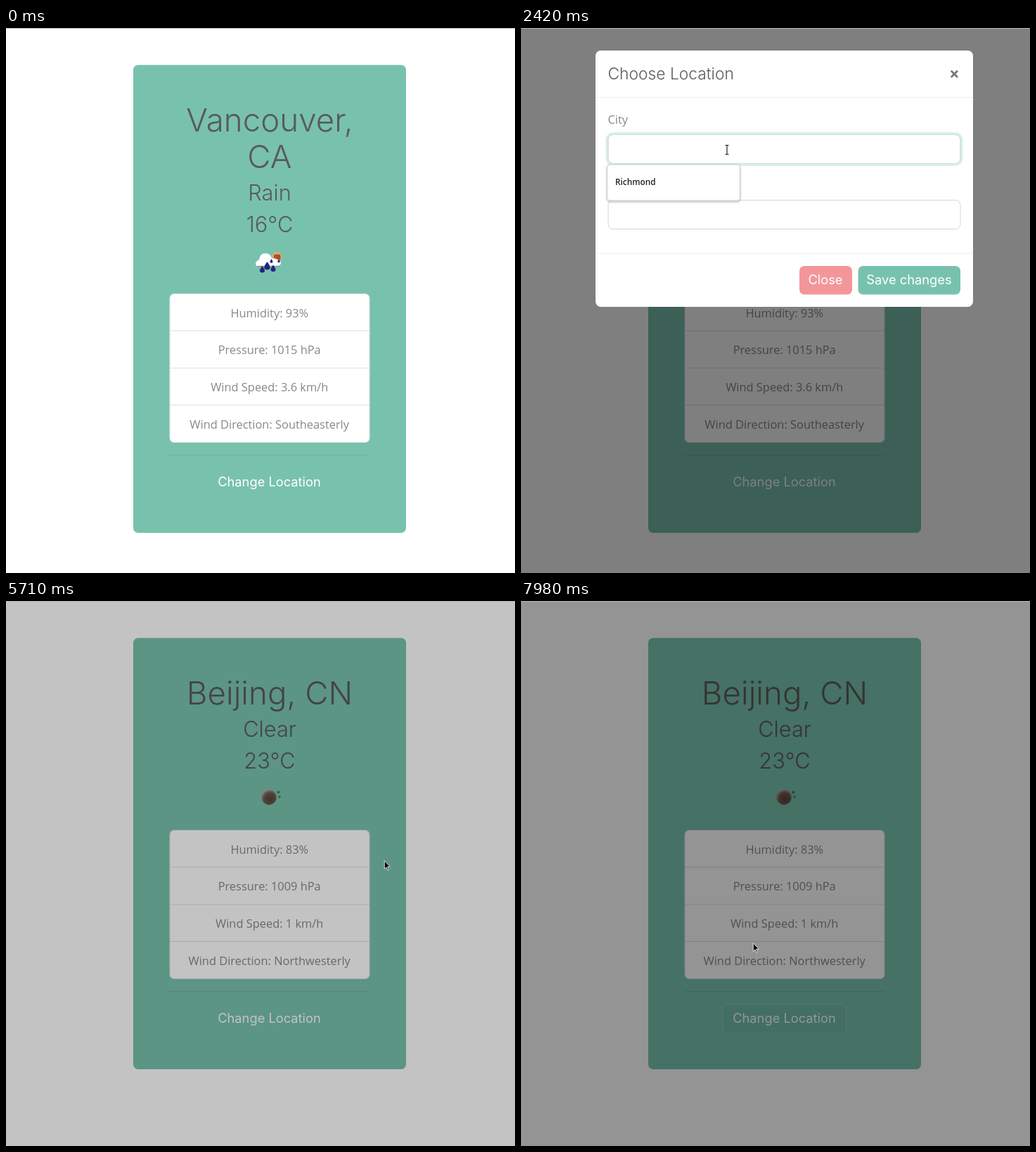
An HTML page that plays this animation: 724 px wide and 774 px high, repeating every 8 s.

```html
<!DOCTYPE html>
<html lang="en">
<head>
<meta charset="utf-8">
<title>Weather card</title>
<style>
  html, body { margin: 0; width: 100%; height: 100%; overflow: hidden; background: #fff; }
  svg { display: block; }
  text { font-family: "Open Sans", "Noto Sans", sans-serif; font-size: 16.4px; fill: #888; white-space: pre; }
  .display { font-family: Montserrat, Inter, sans-serif; fill: #5a5a5a; }
  .mid { text-anchor: middle; }
  .h1 { font-size: 45.7px; font-weight: 300; }
  .h2 { font-size: 30.8px; font-weight: 300; }
  .h5 { font-size: 22.8px; font-weight: 300; }
  .btn { font-size: 18.3px; fill: #fff; }
  .value { fill: #5a5a5a; }
</style>
</head>
<body>
<svg width="724" height="774" viewBox="0 0 724 774">
  <defs>
    <radialGradient id="moonFill" cx=".58" cy=".62" r=".62">
      <stop offset="0" stop-color="#56453a"/>
      <stop offset=".6" stop-color="#67554a"/>
      <stop offset=".85" stop-color="#8d7767"/>
      <stop offset="1" stop-color="#b5a491"/>
    </radialGradient>
    <filter id="soft" x="-10%" y="-20%" width="120%" height="150%">
      <feDropShadow dx="0" dy="1.5" stdDeviation="1.5" flood-opacity=".3"/>
    </filter>
  </defs>

  <rect id="card" x="181" y="52.5" width="388" rx="7" fill="#78c2ad"/>
  <g id="rainy" class="mid">
    <text class="display h1" x="375" y="147">Vancouver,</text>
    <text class="display h1" x="375" y="198.5">CA</text>
    <text class="display h2" x="375" y="245">Rain</text>
    <text class="display h2" x="375" y="289.5">16°C</text>
    <g>
      <circle cx="385.5" cy="325.5" r="6.3" fill="#e9a868" stroke="#e9a868" stroke-width="3" stroke-dasharray="2.5 2.45"/>
      <rect x="381" y="321.5" width="9.500" height="8.500" rx="2.500" fill="#a8522f"/>
      <path d="M356 338q-3-6 4-9 1-9 9-9 7 0 9 7 7 0 8 2 4 0 5 4 0 4-4 5z" fill="#fff"/>
      <path d="M357 338.5h32" stroke="#8d9398" stroke-width="1.5"/>
      <g id="drops" fill="#20267c"></g>
    </g>
  </g>
  <g id="clear" class="mid">
    <text class="display h1" x="375" y="147">Beijing, CN</text>
    <text class="display h2" x="375" y="193">Clear</text>
    <text class="display h2" x="375" y="237.5">23°C</text>
    <circle cx="374" cy="278.7" r="10.7" fill="url(#moonFill)"/>
    <g fill="#4d7569">
      <circle cx="387.5" cy="271.5" r="2"/><circle cx="389" cy="278" r="1.7"/>
    </g>
  </g>
  <g id="details">
    <rect x="232.5" y="377" width="285" height="212" rx="7" fill="#fff"/>
    <rect x="233" y="377.5" width="284" height="211" rx="6.5" fill="none" stroke="#000" stroke-opacity=".125"/>
    <path d="M233 430h284M233 483h284M233 535.5h284" stroke="#000" stroke-opacity=".13"/>
    <g id="rows" class="mid"></g>
    <path d="M232 606.5h285" stroke="#000" stroke-opacity=".1"/>
    <rect id="changeRing" fill="none" stroke="#8ccbb9" stroke-opacity=".55"/>
    <rect id="changeHover" x="287" y="624" width="176" height="42" rx="7" fill="#5eb69d"/>
    <rect id="changeEdge" x="287" y="624.5" width="175.5" height="41.5" rx="7" fill="none" stroke="#8ed2bf"/>
    <text class="display btn mid" x="374.5" y="651">Change Location</text>
  </g>

  <rect id="backdrop" y="1" width="724" height="773"/>

  <g id="modal">
    <rect x="106" y="32" width="537" height="364" rx="7.5" fill="#fff"/>
    <path d="M106 98.5h537M106 320h537" stroke="#ececec"/>
    <text class="display h5" x="123.5" y="73">Choose Location</text>
    <path d="M611.8 60.8l9.2 9.2m0-9.2l-9.2 9.2" stroke="#777" stroke-width="2.7"/>
    <text x="123.5" y="136">City</text>
    <text x="123.5" y="229.5">Country</text>
    <g id="fields"></g>
    <g id="suggestion">
      <rect x="122.5" y="194" width="189" height="51" rx="4" fill="#fff" stroke="#ccc" filter="url(#soft)"/>
      <text x="134" y="223" style="font-size:11.8px;font-weight:600;fill:#222">Richmond</text>
    </g>
    <rect x="396" y="338" width="75" height="40.5" rx="7" fill="#f3969a"/>
    <text class="display btn mid" x="433" y="364">Close</text>
    <rect id="saveRing" fill="none" stroke="#78c2ad" stroke-opacity=".4"/>
    <rect x="479.5" y="338" width="145.5" height="40.5" rx="7" fill="#78c2ad"/>
    <rect id="saveHover" x="479.5" y="338" width="145.5" height="40.5" rx="7" fill="#58b199"/>
    <text class="display btn mid" x="552" y="364">Save changes</text>
  </g>

  <g id="pointer">
    <circle id="click" cy="1.5" r="12" fill="#ff0" fill-opacity=".52"/>
    <path id="arrow" d="M.3.8V12.4L2.9 10L4.8 14.3L6.4 13.6L4.6 9.4H8.2z" fill="#000" stroke="#fff" stroke-width=".8"/>
    <path id="beam" d="M-2.5-6.5h2l.5.6.5-.6h2M0-6V6M-2.5 6.5h2l.5-.6.5.6h2" fill="none" stroke="#222" stroke-width="1.2"/>
    <path id="hand" d="M-1.7 9V.7Q-1.5-1 0-1T1.6.7V6Q4 5 4.4 7 6.7 6 7 8 8.7 7.5 8.8 9.5V12Q8.6 14 7.2 15.5V17.5H-.5V16Q-3 13-4.8 9.8-5 7.6-3 8.2z" fill="#fff" stroke="#222" stroke-width=".9"/>
  </g>
  <path d="M0 .5h724" stroke="#b4b4b4"/>
</svg>
<script>
const LOOP = 8000, FIRST = 70, STEP = 78.3, LEAD = 12;
const CITY_FOCUS = 1860, COUNTRY_FOCUS = 3735, SAVE_FOCUS = 5385;
const OPEN = 1250, CLOSE = 5488, UPDATED = 5600;

const $ = id => document.getElementById(id);
const set = (el, attrs) => { for (const k in attrs) el.setAttribute(k, attrs[k]); };
const show = (el, on) => set(el, { display: on ? 'inline' : 'none' });
const clamp = v => Math.min(1, Math.max(0, v));
const ramp = (t, start, length = 150) => clamp((t - start) / length);
const pulse = (t, on, off, length = 150) => ramp(t, on, length) - ramp(t, off, length);
const easeOut = k => 1 - (1 - k) ** 2;
const during = (t, spans) => spans.some(([a, b]) => t >= a && t < b);
const inside = (x, y, [l, top, r, b]) => x >= l && x <= r && y >= top && y <= b;

// Waypoints are [time, x, y].
const PATHS = [
  [[70, 576, 713], [230, 525, 694], [400, 440, 660], [540, 408, 648], [1090, 408, 648],
   [1244, 380, 530], [1480, 318, 268], [1640, 298, 190], [1792, 293, 173]],
  [[4768, 293, 173], [4925, 335, 205], [5160, 480, 318], [5390, 538, 368], [5710, 538, 368],
   [5950, 550, 475], [6200, 567, 655], [6412, 577, 769]],
  [[7430, 515, 754], [7590, 452, 660], [7740, 392, 599], [7850, 385, 592], [7978, 330, 485]]
];
const VISIBLE = [[60, 2790], [4800, 6480], [7420, LOOP]];
const CLICKS = [[995, 1100], [CITY_FOCUS, 1990], [5380, 5500], [7800, 7860]];

function pointerAt(t) {
  const path = PATHS[t < 4000 ? 0 : t < 7000 ? 1 : 2];
  const i = path.findIndex(p => p[0] > t);
  if (i === 0) return path[0].slice(1);
  if (i < 0) return path[path.length - 1].slice(1);
  const [a, b] = [path[i - 1], path[i]], k = (t - a[0]) / (b[0] - a[0]);
  return [a[1] + (b[1] - a[1]) * k, a[2] + (b[2] - a[2]) * k];
}

const ROWS = [
  ['Humidity: 93%', 'Humidity: 83%'],
  ['Pressure: 1015 hPa', 'Pressure: 1009 hPa'],
  ['Wind Speed: 3.6 km/h', 'Wind Speed: 1 km/h'],
  ['Wind Direction: Southeasterly', 'Wind Direction: Northwesterly']
];
$('rows').innerHTML = ROWS.map((_, i) => `<text x="374.7" y="${410.5 + i * 52.8}"></text>`).join('');
$('drops').innerHTML = [[364.5, 343, 1], [371.5, 338, 1.2], [380, 341.5, 1], [377.5, 331, .6], [388, 331, .5]]
  .map(([x, y, s]) => `<path transform="translate(${x} ${y}) scale(${s})" d="M0-5Q7 4 0 4.5Q-7 4 0-5"/>`).join('');

const FIELDS = [
  { top: 151.5, text: 'BEIJING', focus: CITY_FOCUS, blur: COUNTRY_FOCUS,
    keys: [2790, 2950, 3030, 3185, 3265, 3340, 3420] },
  { top: 244.5, text: 'CN', focus: COUNTRY_FOCUS, blur: SAVE_FOCUS, keys: [4205, 4755] }
];
for (const field of FIELDS) {
  const g = document.createElementNS('http://www.w3.org/2000/svg', 'g');
  const box = `x="124" y="${field.top}" width="501" height="41" rx="7"`;
  g.innerHTML = `<rect fill="none" stroke="#78c2ad" stroke-opacity=".27"/>
    <rect ${box} fill="#fff" stroke="#d3d6d8"/>
    <rect ${box} fill="none" stroke="#c5e5dc"/>
    <text class="value" x="137.5" y="${field.top + 26.5}"></text>
    <rect y="${field.top + 9}" width="1" height="23" fill="#444"/>`;
  $('fields').append(g);
  [field.ring, , field.edge, field.label, field.caret] = g.children;
}

function drawRing(el, [l, top, r, b], width) {
  set(el, { x: l - width / 2, y: top - width / 2, width: r - l + width, height: b - top + width,
    rx: 7 + width / 2, 'stroke-width': width });
}

function drawField(f, t) {
  const focus = pulse(t, f.focus, f.blur, 140);
  const typed = f.keys.filter(k => t >= k).length;
  const since = t - (typed ? f.keys[typed - 1] : f.focus);
  drawRing(f.ring, [124, f.top, 625, f.top + 41], 3.4 * focus);
  set(f.edge, { opacity: focus });
  f.label.textContent = f.text.slice(0, typed);
  set(f.caret, { x: Math.round(138 + (typed ? f.label.getComputedTextLength() : 0)) });
  show(f.caret, t >= f.focus && t < f.blur && since % 1060 < 530);
}

function drawCard(t) {
  const updated = t >= UPDATED;
  set($('card'), { height: updated ? 612.5 : 664.5 });
  show($('rainy'), !updated);
  show($('clear'), updated);
  set($('details'), { transform: `translate(0 ${updated ? -52 : 0})` });
  [...$('rows').children].forEach((row, i) => row.textContent = ROWS[i][+updated]);
  const ring = 3 * (pulse(t, 1000, 1260) + ramp(t, 5780) - ramp(t, 7860, 110));
  drawRing($('changeRing'), [287, 624, 463, 666], ring);
  set($('changeHover'), { opacity: pulse(t, 395, 1090) + pulse(t, 7680, 7870) });
  set($('changeEdge'), { opacity: ramp(t, 7860, 110) });
}

function drawModal(t) {
  set($('backdrop'), { opacity: .5 * (pulse(t, 1085, 5628) + ramp(t, 7852)) });
  const lift = 54 * (1 - easeOut(ramp(t, OPEN, 300)) + easeOut(ramp(t, CLOSE, 300)));
  const opacity = pulse(t, OPEN, CLOSE);
  set($('modal'), { opacity, transform: `translate(0 ${-lift})` });
  show($('modal'), opacity > 0);
  FIELDS.forEach(f => drawField(f, t));
  show($('suggestion'), during(t, [[1940, 2790]]));
  drawRing($('saveRing'), [479.5, 338, 625, 378.5], 3.4 * ramp(t, SAVE_FOCUS, 130));
  set($('saveHover'), { opacity: ramp(t, 5230) });
}

function drawPointer(t) {
  const [x, y] = pointerAt(t);
  const shift = t >= UPDATED ? 52 : 0;
  let kind = 'arrow';
  if (during(t, [[1480, 5600]])) {
    if (inside(x, y, [479, 338, 625, 378])) kind = 'hand';
    else if (FIELDS.some(f => inside(x, y, [124, f.top, 625, f.top + 41]))) kind = 'beam';
  } else if (inside(x, y, [287, 624 - shift, 463, 666 - shift])) kind = 'hand';
  set($('pointer'), { transform: `translate(${x} ${y})` });
  show($('pointer'), during(t, VISIBLE));
  for (const id of ['arrow', 'beam', 'hand']) show($(id), id === kind);
  show($('click'), during(t, CLICKS));
}

function render(time) {
  const t = Math.max(0, FIRST + STEP * Math.floor((time - FIRST + LEAD) / STEP));
  drawCard(t);
  drawModal(t);
  drawPointer(t);
}

const start = performance.now();
function tick() {
  render((performance.now() - start) % LOOP);
  requestAnimationFrame(tick);
}
tick();
</script>
</body>
</html>
```
